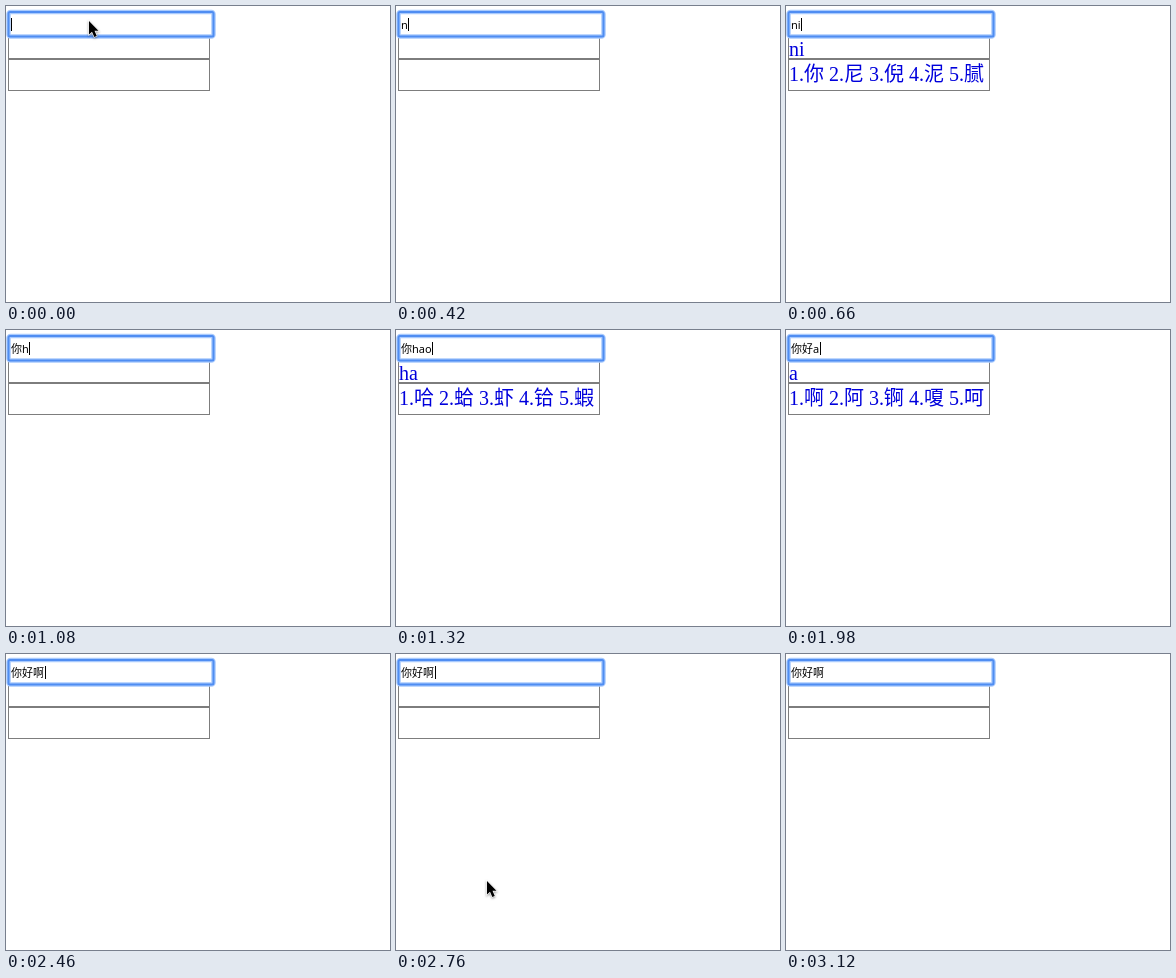
Animation, 384 px wide and 296 px high, one loop 3240 ms. Source, as an HTML page:

```html
<!DOCTYPE html>
<html lang="zh">
<head>
<meta charset="utf-8">
<style>
  html, body { margin: 0; width: 100%; height: 100%; overflow: hidden; background: #fff; }
  svg { display: block; width: 384px; height: 296px; }
  text { white-space: pre; }
  .panel { fill: #fff; stroke: #7d7d7d; }
  .ime { font: 20px "Liberation Serif", "Noto Sans CJK SC", "Noto Sans CJK JP", serif; fill: #0000dc; }
  #typed { font: 11px "Noto Sans", "Noto Sans CJK SC", "Noto Sans CJK JP", sans-serif; }
</style>
</head>
<body>
<svg viewBox="0 0 384 296">
  <rect class="panel" x="2.5" y="30.5" width="201" height="22"/>
  <rect class="panel" x="2.5" y="53.5" width="201" height="31"/>
  <g fill="none">
    <rect x="2.5" y="6" width="205" height="24.5" rx="2" fill="#fff" stroke="#a9cafd" stroke-width="4.5"/>
    <rect x="2.5" y="6" width="205" height="24.5" rx="1.5" stroke="#4f8df2" stroke-width="2"/>
  </g>
  <text id="typed" x="5" y="23"></text>
  <rect id="caret" y="12" width="1" height="13"/>
  <text id="pinyin" class="ime" x="3" y="50"></text>
  <text id="choices" class="ime" x="3" y="75"></text>
  <path id="mouse" d="M0 0V13.5L3 10.7L5.3 16L7.8 15L5.5 9.8H9.5Z" stroke="#fff" stroke-width="1.2" paint-order="stroke"
        style="filter: drop-shadow(0 1px 1px #0006)"/>
</svg>
<script>
const LOOP = 3240;
const [typed, caret, pinyin, choices, mouse] =
  ["typed", "caret", "pinyin", "choices", "mouse"].map(id => document.getElementById(id));

const dictionary = { ni: "你尼倪泥腻", ha: "哈蛤虾铪蝦", hao: "好号毫豪耗", a: "啊阿锕嗄呵" };

// [start, input text, syllable looked up]
const typing = [
  [0, "", ""], [420, "n", ""], [540, "ni", ""], [660, "ni", "ni"],
  [840, "你", "ni"], [900, "你", ""], [1080, "你h", ""], [1200, "你ha", ""],
  [1320, "你hao", "ha"], [1440, "你hao", "hao"], [1620, "你好", "hao"], [1680, "你好", ""],
  [1920, "你好a", ""], [1980, "你好a", "a"], [2340, "你好啊", "a"], [2400, "你好啊", ""]
];

// [start, x, y]; no position means the pointer is hidden
const pointer = [
  [0, 83, 15], [420], [2640, 84, 40], [2700, 89, 140], [2760, 91, 227],
  [2820, 78, 252], [2880, 52, 272], [2940, 28, 284], [3000, 10, 292], [3060]
];

const at = (steps, t) => steps.findLast(step => step[0] <= t);
const show = (node, visible) => node.setAttribute("visibility", visible ? "visible" : "hidden");

function draw(t) {
  const [, text, syllable] = at(typing, t);
  typed.textContent = text;
  pinyin.textContent = syllable;
  choices.textContent = [...(dictionary[syllable] || "")].map((c, i) => `${i + 1}.${c}`).join(" ");

  caret.setAttribute("x", text ? Math.floor(6 + typed.getComputedTextLength()) : 5);
  show(caret, t < 60 || (t >= 420 && t < 3120));

  const [, x, y] = at(pointer, t);
  show(mouse, x !== undefined);
  if (x !== undefined) mouse.setAttribute("transform", `translate(${x} ${y})`);
}

const start = performance.now();
function tick() {
  draw((performance.now() - start) % LOOP);
  requestAnimationFrame(tick);
}
tick();
</script>
</body>
</html>
```
